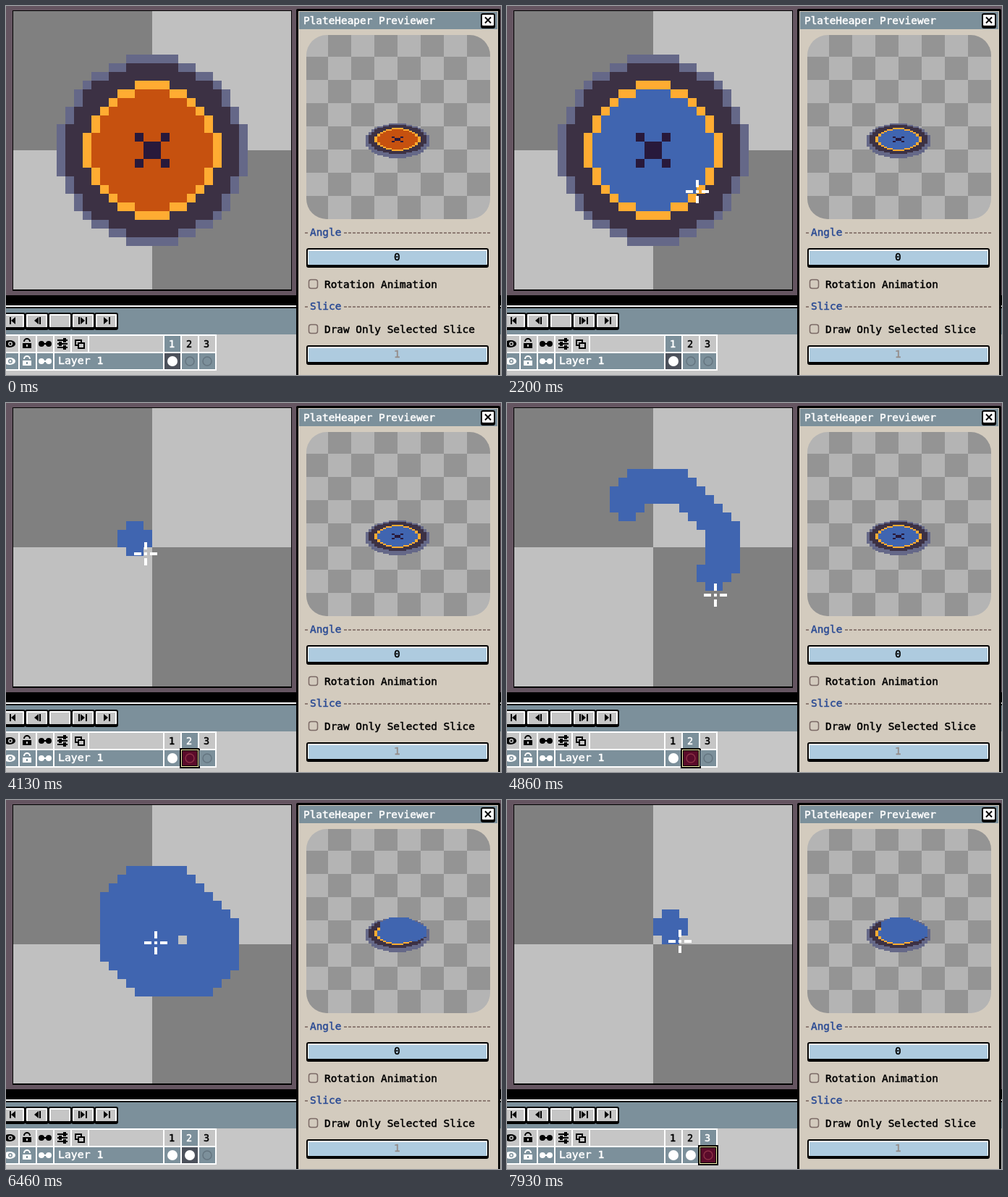
An HTML page with a canvas that plays this animation: 684 by 509 pixels, repeating every 8000 ms.

```html
<!DOCTYPE html>
<html lang="en">
<head>
<meta charset="utf-8">
<title>Sprite editor</title>
<style>
html, body { margin: 0; overflow: hidden; }
canvas { display: block; }
</style>
</head>
<body>
<canvas id="stage" width="684" height="509"></canvas>
<script>
const g = document.getElementById('stage').getContext('2d');
const LOOP = 8000, BLUE = '#4065b0', BAR = '#7c909b', FACE = '#d3cbbe', CELL = '#c6c6c6';
const FILL = 1130, FILL_SHOWN = 1260, OPEN_2 = 2800, DRAW = 4330, PAUSE = 5600,
      REFILL = 5660, DRAWN = 6060, SHOWN = 6200, OPEN_3 = 7400;
const LAG = 40; // paint trails the pointer

function box(x, y, w, h, color) {
  g.fillStyle = color;
  g.fillRect(x, y, w, h);
}
function text(s, x, y, color = '#000', size = 14.4) {
  g.font = size + 'px "DejaVu Sans Mono", "Liberation Mono", monospace';
  g.fillStyle = g.strokeStyle = color;
  g.lineWidth = 0.5;
  g.fillText(s, x, y);
  g.strokeText(s, x, y);
}
function trace(...p) {
  g.beginPath();
  for (let i = 0; i < p.length; i += 2) g.lineTo(p[i], p[i + 1]);
  g.closePath();
}
function round(x, y, w, h, r, color) {
  g.fillStyle = color;
  g.beginPath();
  g.roundRect(x, y, w, h, r);
  g.fill();
}
function outline(color, width) {
  g.strokeStyle = color;
  g.lineWidth = width;
  g.stroke();
}
function circle(x, y, r, fill, stroke) {
  g.beginPath();
  g.arc(x, y, r, 0, 7);
  if (fill) { g.fillStyle = fill; g.fill(); }
  if (stroke) outline(stroke, 1.5);
}
function scaled(x, y, sx, sy, draw) {
  g.save();
  g.translate(x, y);
  g.scale(sx, sy);
  draw();
  g.restore();
}

// --- Artwork, one unit per cell
function disc(radiusSquared, color) {
  for (let r = 0; r < 22; r++) {
    const rest = radiusSquared - (r - 10.5) ** 2;
    const half = rest < 0 ? 0 : Math.floor(Math.sqrt(rest) + 0.5);
    box(11 - half, r, 2 * half, 1, color);
  }
}
function button(inside) {
  disc(118, '#656888');
  disc(100, '#3c3144');
  disc(59, '#ffac32');
  disc(46, inside);
  box(10, 10, 2, 2, '#28193b');
  for (const x of [9, 12]) for (const y of [9, 12]) box(x, y, 1, 1, '#28193b');
}

// Strokes as the brush's corner cells: an octagon and a band, then the middle
const AROUND = [[1, 2], [2, 0], [7, 0], [12, 5], [12, 9], [10, 11], [3, 11], [0, 8], [1, 7],
  [0, 6], [0, 2], [1, 1], [1, 3], [8, 3], [8.6, 3.6]];
const INSIDE = [[8.6, 3.6], [8, 4], [10, 5], [10, 8], [9, 9], [4, 9], [3, 7], [5, 6]];

// Even speed along a stroke, as [time, x, y] keys
function stroke(points, from, to) {
  const dist = [0];
  for (let i = 1; i < points.length; i++)
    dist.push(dist[i - 1] + Math.hypot(points[i][0] - points[i - 1][0], points[i][1] - points[i - 1][1]));
  return points.map(([c, r], i) =>
    [from + (to - from) * dist[i] / dist.at(-1), 168 + 12 * c, 133 + 12 * r]);
}

const KEYS = [
  [60, 645, 500], [860, 266, 193], [2130, 266, 193], [2460, 253, 485], [3460, 253, 485],
  [4130, 193, 208], ...stroke(AROUND, DRAW, PAUSE), ...stroke(INSIDE, REFILL, DRAWN),
  [6260, 206, 196], [6460, 206, 196], [6830, 662, 440], [7200, 246, 465], [7330, 246, 465],
  [OPEN_3, 268, 483], [7930, 239, 195], [LOOP, 239, 195]
];
function cursorAt(t) {
  const i = Math.max(1, KEYS.findIndex(k => k[0] >= t));
  const [a, b] = [KEYS[i - 1], KEYS[i]];
  const p = Math.max(0, (t - a[0]) / (b[0] - a[0] || 1));
  return [a[1] + (b[1] - a[1]) * p, a[2] + (b[2] - a[2]) * p];
}

// A 4 by 4 brush without its corners
function eachBrushCell([x, y], visit) {
  const c = Math.round((x - 168) / 12), r = Math.round((y - 133) / 12);
  for (let j = 0; j < 4; j++)
    for (let i = 0; i < 4; i++)
      if (i % 3 || j % 3) visit(c + i, r + j);
}

// Time at which each cell is first painted
const painted = new Map();
for (let t = DRAW; t <= DRAWN; t += 2)
  eachBrushCell(cursorAt(t), (c, r) => {
    const key = c + 16 * r;
    if (!painted.has(key)) painted.set(key, t + LAG);
  });
function blob(t) {
  for (const [key, at] of painted) if (at <= t) box(key % 16, key >> 4, 1, 1, BLUE);
}

// --- Interface
function editor(t, active) {
  box(0, 0, 684, 509, '#655561');
  box(9, 6, 386, 387, '#000');
  box(10, 7, 384, 384, '#c0c0c0');
  box(10, 7, 192, 192, '#808080');
  box(202, 199, 192, 192, '#808080');
  if (active === 1) scaled(70, 67, 12, 12, () => button(t < FILL ? '#c6510f' : BLUE));
  if (active === 2) scaled(130, 91, 12, 12, () => blob(t));
}

function playButton(i, dir, ...bars) {
  const x = 32 * i - 6, m = x + 16;
  round(x, 423, 33, 24, 3, '#000');
  round(x + 2, 425, 29, 18, 1, '#fff');
  box(x + 4, 427, 25, 16, CELL);
  for (const b of bars) box(m + b, 429, 2, 10, '#000');
  trace(m - 3 * dir, 429, m - 3 * dir, 439, m + 3 * dir, 434);
  g.fill();
}
function rowIcons(y, ink, back) {
  g.fillStyle = ink;
  g.beginPath();
  g.ellipse(5, y, 8, 5, 0, 0, 7);
  g.fill();
  circle(6, y, 3, back);
  circle(6, y, 1.5, ink);
  box(23, y - 1, 12, 7, ink);
  g.beginPath();
  g.arc(29, y - 3, 4, Math.PI, 0);
  outline(ink, 2);
  box(28, y + 1, 2, 3, back);
  circle(49, y, 4, ink);
  circle(59, y, 4, ink);
  box(49, y - 1, 10, 2, ink);
}

function timeline(t, active) {
  box(0, 399, 684, 110, '#000');
  box(0, 413, 684, 2, '#fff');
  box(0, 417, 684, 36, BAR);
  box(0, 453, 684, 56, CELL);
  playButton(0, -1, -5);
  playButton(1, -1, 4);
  playButton(2, 1);
  playButton(3, 1, -6, 4);
  playButton(4, 1, 4);

  box(0, 453, 291, 50, '#fff');
  for (let i = 0; i < 5; i++) box(24 * i - 5, 455, 22, 22, CELL);
  for (let i = 0; i < 3; i++) box(24 * i - 5, 479, 22, 22, BAR);
  box(115, 455, 102, 22, CELL);
  box(67, 479, 150, 22, BAR);
  rowIcons(466, '#000', CELL);
  rowIcons(490, '#fff', BAR);
  for (let i = 0; i < 3; i++) {
    box(71, 460 + 5 * i, 14, 2, '#000');
    box(i % 2 ? 73 : 79, 458 + 5 * i, 4, 6, '#000');
  }
  for (const d of [0, 4]) {
    box(95 + d, 460 + d, 10, 9, '#000');
    box(97 + d, 462 + d, 6, 5, CELL);
  }
  text('Layer 1', 72, 494, '#fff', 14.8);

  for (let n = 1; n <= 3; n++) {
    const x = 195 + 24 * n, on = n === active;
    const full = n === 1 || (n === 2 && t >= SHOWN);
    box(x, 455, 22, 22, on ? BAR : CELL);
    text(n, x + 6, 471, on ? '#fff' : '#000', 13.5);
    box(x, 479, 22, 22, on ? '#4c515b' : BAR);
    if (on && !full) {
      box(x - 3, 476, 28, 28, '#000');
      box(x - 1, 478, 24, 24, '#fff1b0');
      box(x, 479, 22, 22, '#000');
      box(x + 1, 480, 20, 20, '#5a0b2a');
    }
    if (full) circle(x + 11, 490, 7, '#fff');
    else circle(x + 11, 490, 6, null, on ? '#8b3045' : '#657580');
  }
}

function heading(s, y) {
  for (let x = 413; x < 670; x += 6)
    if (x < 418 || x > 465) box(x, y - 5, 4, 2, '#8d7b73');
  text(s, 420, y, '#2b4b94');
}
function slider(y, s, color) {
  round(415, y, 252, 27, 3, '#000');
  round(417, y + 2, 248, 21, 1, '#fff');
  box(418, y + 4, 246, 19, '#aecbdf');
  text(s, 536, y + 17, color);
}
function check(y, s) {
  g.beginPath();
  g.roundRect(418.5, y - 11.5, 12, 12, 3);
  outline('#7b6a66', 1.5);
  text(s, 440, y);
}

function panel(t) {
  round(401, 4, 282, 520, 2, '#000');
  box(404, 7, 276, 502, FACE);
  box(405, 8, 274, 24, BAR);
  text('PlateHeaper Previewer', 411, 25, '#fff');
  round(656, 10, 20, 21, 3, '#000');
  round(658, 12, 16, 15, 1, '#fff');
  g.beginPath();
  for (const s of [-4, 4]) { g.moveTo(666 - s, 15.5); g.lineTo(666 + s, 23.5); }
  outline('#000', 2);

  g.save();
  g.beginPath();
  g.roundRect(415, 40, 254, 254, 28);
  g.clip();
  for (let i = 0; i < 8; i++)
    for (let j = 0; j < 8; j++)
      box(413 + 32 * i, 38 + 32 * j, 32, 32, (i + j) % 2 ? '#949494' : '#b4b4b4');
  g.restore();
  for (let k = 4; k >= 0; k--)
    scaled(497, 162 + k, 4, 2, () => button(t < FILL_SHOWN ? '#c6510f' : BLUE));
  if (t >= SHOWN)
    for (let k = 3; k >= 0; k--) scaled(517, 162 + k, 4, 2, () => blob(t));

  heading('Angle', 317);
  slider(334, '0', '#000');
  check(389, 'Rotation Animation');
  heading('Slice', 419);
  check(451, 'Draw Only Selected Slice');
  slider(468, '1', '#958c89');
}

// --- Pointer
function arrow() {
  trace(3, 3, 17, 3, 13, 8, 22, 18, 18, 22, 8, 13, 3, 17);
  outline('#000', 7);
  outline('#fff', 3);
  g.fillStyle = '#000';
  g.fill();
}
function pointer(t, active) {
  if (t < 60) return;
  const [x, y] = cursorAt(t).map(Math.round);
  if (x > 400 || y > 398) return scaled(x, y, 1, 1, arrow);
  if (active === 1)
    box(70 + 12 * Math.floor((x - 80) / 12), 67 + 12 * Math.floor((y - 84) / 12), 12, 12, BLUE);
  else if (t < DRAW || t > DRAWN + LAG)
    eachBrushCell([x, y], (c, r) => box(130 + 12 * c, 91 + 12 * r, 12, 12, BLUE));
  box(x - 2, y - 2, 4, 4, '#fff');
  for (const d of [-16, 6]) {
    box(x - 2, y + d, 4, 10, '#fff');
    box(x + d, y - 2, 10, 4, '#fff');
  }
}

function frame() {
  const t = performance.now() % LOOP;
  const active = t < OPEN_2 ? 1 : t < OPEN_3 ? 2 : 3;
  editor(t, active);
  timeline(t, active);
  panel(t);
  pointer(t, active);
  requestAnimationFrame(frame);
}
frame();
</script>
</body>
</html>
```
